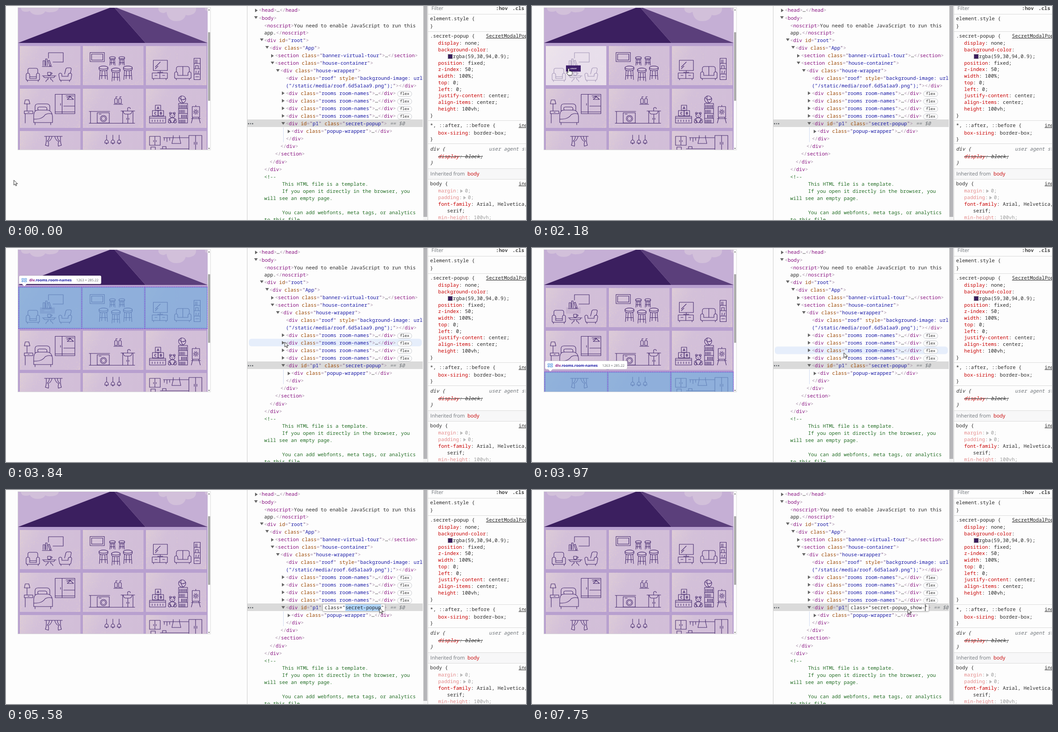
An HTML page for the animation above (8 s loop, 1163 px wide and 481 px high).

```html
<!DOCTYPE html>
<html lang="en">
<head>
<meta charset="utf-8">
<title>House inspector</title>
<style>
html, body { margin: 0; width: 100%; height: 100%; overflow: hidden; background: #fdfdfd; }
#stage { position: relative; width: 1163px; height: 481px; overflow: hidden; text-rendering: geometricPrecision; }
#stage > svg { position: absolute; left: 0; top: 0; }
#tree, #css { position: absolute; top: 0; height: 481px; overflow: hidden; font: 11.08px/17px "Noto Sans Mono", monospace; color: #2a2a2a; }
#tree { left: 540px; width: 392px; }
#css { left: 944px; width: 219px; }
.line { position: absolute; white-space: pre; height: 17px; }
.sans { font-family: "Open Sans", "Noto Sans", sans-serif; font-size: 11.4px; }
.t { color: #a48ca4; } .q { color: #6f4c7c; } .n { color: #881280; } .a { color: #994500; } .v { color: #1a1aa6; }
.c { color: #236e25; } .p { color: #c80000; } .g { color: #70757a; } .i { font-style: italic; }
.u { text-decoration: underline; } .dim { opacity: .45; } .bar { font-weight: 600; color: #444; }
.rule { position: absolute; left: 0; width: 219px; height: 1px; background: #dadada; }
.tri { position: absolute; width: 0; height: 0; border: solid transparent; }
.shut { border-width: 4px 0 4px 6px; border-left-color: #666; }
.open { border-width: 6px 4px 0; border-top-color: #666; }
.badge { position: absolute; left: 335px; width: 31px; height: 11px; border: 1px solid #c4c7cc; border-radius: 7px; font-size: 8.8px; line-height: 11px; text-align: center; background: #fdfdfd; }
#picked { position: absolute; left: 0; top: 255px; width: 392px; height: 17px; background: #dadada; animation: pick 8s step-end infinite; }
#hover { position: absolute; left: 3px; top: 0; width: 387px; height: 17px; border-radius: 6px; background: #e6eefb; animation: hover 8s step-end infinite; }
#row { display: flex; }
#attr { position: relative; display: flex; }
#edit { position: absolute; left: -3px; top: 1px; right: -2px; height: 15px; line-height: 15px; padding-left: 3px; display: flex; background: #fff; color: #222; box-shadow: 0 0 0 1px #bbb, 0 1px 4px #0005; animation: edit 8s step-end infinite; }
#sel { animation: sel 8s step-end infinite; }
.typed { overflow: hidden; width: 0; animation: type 8s step-end infinite; }
#caret { width: 1px; margin-right: -1px; background: #000; animation: caret 8s step-end infinite; }
#veil { animation: veil 8s step-end infinite; }
#btn { animation: btn 8s step-end infinite; }
#mark1 { animation: mark1 8s step-end infinite; }
#mark3 { animation: mark3 8s step-end infinite; }
#cursor { animation: move 8s step-end infinite; }
#arrow { animation: arrow 8s step-end infinite; }
#hand { animation: hand 8s step-end infinite; }
.art { fill: none; stroke: #43286c; stroke-width: 1.1; stroke-linejoin: round; stroke-linecap: round; }

@keyframes move {
  0% { transform: translate(17.5px, 391px); }
  1.875% { transform: translate(15.5px, 372px); }
  3.375% { transform: translate(15.5px, 351px); }
  5.25% { transform: translate(16px, 305px); }
  6.75% { transform: translate(22px, 271px); }
  8.625% { transform: translate(36px, 212px); }
  10.25% { transform: translate(66px, 158px); }
  11.75% { transform: translate(80px, 144px); }
  16.875% { transform: translate(81px, 142px); }
  18.375% { transform: translate(82px, 141px); }
  27.25% { transform: translate(82px, 140px); }
  46.125% { transform: translate(381px, 173px); }
  48% { transform: translate(623.5px, 211px); }
  49.625% { transform: translate(697.5px, 235px); }
  51.375% { transform: translate(724px, 248px); }
  53% { transform: translate(748px, 273px); }
  54.5% { transform: translate(764px, 278px); }
  56.25% { transform: translate(780.5px, 278px); }
  58.125% { transform: translate(797px, 270px); }
  59.625% { transform: translate(810px, 263px); }
  61.125% { transform: translate(821px, 259px); }
  63.125% { transform: translate(826px, 254px); }
  64.875% { transform: translate(830px, 259px); }
  66.375% { transform: translate(834px, 264px); }
  68% { transform: translate(835px, 265px); }
  69.75% { transform: translate(835.5px, 265px); }
  73% { transform: translate(837px, 266px); }
  74.75% { transform: translate(838.5px, 266px); }
  78.125% { transform: translate(838px, 263px); }
  79.625%, 100% { transform: translate(840.5px, 267px); }
}
@keyframes arrow { 0% { opacity: 1; } 10.25% { opacity: 0; } 48%, 100% { opacity: 1; } }
@keyframes hand { 0% { opacity: 0; } 10.25% { opacity: 1; } 48%, 100% { opacity: 0; } }
@keyframes veil { 0% { opacity: 0; } 10.25% { opacity: .12; } 11.75% { opacity: .25; } 13.5% { opacity: .38; } 15% { opacity: .5; } 48%, 100% { opacity: 0; } }
@keyframes btn { 0% { opacity: 0; } 10.25% { opacity: .2; } 11.75% { opacity: .45; } 13.5% { opacity: .65; } 15% { opacity: .8; } 16.875% { opacity: .93; } 18.375% { opacity: 1; } 48% { opacity: .25; } 49.625% { opacity: .08; } 51.375%, 100% { opacity: 0; } }
@keyframes mark1 { 0% { opacity: 0; } 48% { opacity: 1; } 49.625%, 100% { opacity: 0; } }
@keyframes mark3 { 0% { opacity: 0; } 49.625% { opacity: 1; } 51.375%, 100% { opacity: 0; } }
@keyframes hover {
  0% { transform: translateY(-30px); }
  48% { transform: translateY(204px); }
  49.625% { transform: translateY(221.5px); }
  51.375% { transform: translateY(238.5px); }
  53% { transform: translateY(273px); }
  58.125%, 100% { transform: translateY(-30px); }
}
@keyframes pick { 0% { background: #dadada; } 64.875% { background: #cfe8fc; } 66.375%, 100% { background: #dadada; } }
@keyframes edit { 0% { opacity: 0; } 66.375%, 100% { opacity: 1; } }
@keyframes sel { 0% { background: #b0d6fb; } 74.75%, 100% { background: transparent; } }
@keyframes caret { 0% { opacity: 0; } 76.25% { opacity: 1; } 83% { opacity: 0; } 89.625%, 100% { opacity: 1; } }
@keyframes type { 0% { width: 0; } 89.625% { width: 1ch; } 93.25% { width: 3ch; } 95% { width: 5ch; } 96.875%, 100% { width: 6ch; } }
</style>
</head>
<body>
<div id="stage">
<svg width="1163" height="481">
  <defs>
    <clipPath id="view"><rect x="27" y="4" width="424" height="319"/></clipPath>
    <linearGradient id="wall" x2="1" y2=".4"><stop stop-color="#dccbd8"/><stop offset=".35" stop-color="#d3c0d9"/><stop offset="1" stop-color="#d2bed8"/></linearGradient>
    <g id="stool">
      <ellipse cx="11" cy="4" rx="10" ry="3.6"/>
      <path d="M1 4V7Q1 11 11 11T21 7V4M3.500 10L2 31M18.500 10L20 31M8 11.500L7 29M14 11.500L15 29M3 22H19"/>
    </g>
    <g id="pendant"><path d="M0 290V301M-4 308Q-4 301 0 301T4 308ZM-1.5 308Q0 313 1.5 308"/></g>
    <g id="tip">
      <path d="M32 62H210Q213 62 213 65V78Q213 81 210 81H46L41 86.5L36 81H32Q29 81 29 78V65Q29 62 32 62Z" fill="#fff" stroke="#0002"/>
      <path d="M35.5 68.5H40V71.5H35.5ZM42 68.5H46V71.5H42ZM35.5 73.5H38V76H35.5ZM40 73.5H46V76H40Z" fill="none" stroke="#4a8fe0"/>
      <g font-family="Open Sans, Noto Sans, sans-serif">
        <text x="52" y="75" font-size="8.25" font-weight="700" fill="#1a1aa6"><tspan fill="#881280">div</tspan>.rooms.room-names</text>
        <text x="157" y="75" font-size="7.7" fill="#5f6368">1263 × 285.22</text>
      </g>
    </g>
  </defs>
  <rect x="26.5" y="3.5" width="431" height="320" fill="#fdfdfd" stroke="#dcdcdc"/>
  <g clip-path="url(#view)">
    <rect x="27" y="4" width="424" height="319" fill="#c5afd5"/>
    <path d="M33 4Q34 13 45 13Q50 13 53 11Q58 20 71 20Q83 20 88 12Q93 15 100 14Q117 13 118 4ZM341 4Q339 14 352 16Q356 15 359 13Q362 34 381 34Q398 34 402 20Q407 22 413 20Q426 17 425 4ZM451 4H445Q444 10 451 12Z" fill="#d2c0da"/>
    <rect x="27" y="83" width="424" height="240" fill="#b8a0cf"/>
    <path d="M27 83L240 1L312 83Z" fill="#3b1f5f"/>
    <path d="M240 1L451 83H312Z" fill="#5b3f7b"/>
    <g id="cards"></g>
    <g class="art">
      <path d="M95 117V105H128V126H105M81 136H103M83 134V123H87V134M88.500 134V119H92V134M94 123L97 122L101 134L98 135Z"/>
      <path d="M49 151V144Q49 140 53 140H67Q71 140 71 144V151M45 155Q45 151 49 151T53 155V159H68V155Q68 151 71.500 151T75 155V164Q75 167 72 167H48Q45 167 45 164ZM53 159V163H68V159M48 167V170M72 167V170"/>
      <path d="M131 153L134 141Q135 139 138 139H143Q146 139 146 142L144 151M118 155Q118 151 121.500 151T125 155V158H139V154Q140 151 143.500 151T147 155L145 165Q144 167 141 167H123Q120 167 120 165ZM123 167V170M142 167V170"/>
      <path d="M81 157H112M84 157Q84 161 88 161H105Q109 161 109 157M94 161V165Q90 166 89 170M100 161V165Q104 166 105 170M93 149H100V153Q100 156 96.500 156T93 153ZM100 150Q104 150 103 152T100 154"/>
      <path d="M188 104.500H220V125H188ZM191.500 108H216.500V121.500H191.500Z"/>
      <use href="#stool" transform="translate(231 113.500)scale(.64)" stroke-width="1.6"/><use href="#stool" transform="translate(252 113.500)scale(.64)" stroke-width="1.600"/>
      <use href="#stool" transform="translate(207 134.500)"/><use href="#stool" transform="translate(235 139)scale(.97)"/><use href="#stool" transform="translate(261.500 134.500)"/>
      <path d="M329.500 122H361V145H329.500ZM334 137L345 126M334 141L340 135M345 145V149M339 149H351M327 150.500H361V163H327ZM344 150.500V163M330 163V166M358 163V166M333 156H338M350 156H355"/>
      <path d="M381 148V141Q381 136 386 136H405Q410 136 410 141V148M395.500 136V156M377 152Q377 148 380.500 148T384 152V156H407V152Q407 148 410.500 148T414 152V160Q414 163 411 163H380Q377 163 377 160ZM381 163V166M410 163V166"/>
      <path d="M420.500 117.500H434.500V165.500H420.500ZM420.500 129H434.500M420.500 141H434.500M420.500 153H434.500M424 121V129M427 121V129M424 141V134H430V141M425 153V146M429 153L431 146M424 159H431"/>
      <path d="M43 211H51L53.500 220H41ZM47 220V235M41 236H60V242H41ZM43 242V263M49 239H52"/>
      <path d="M65 236V226Q65 220 72 220H91Q98 220 98 227V235M72 234Q69 227 75 227H88Q93 228 91 234M62 262V245Q63 234 71 234H94Q103 236 104 248V262ZM62 254Q80 256 88 244Q96 240 103 243M65 262V267M100 262V267"/>
      <path d="M110 198.500H154V242H110ZM125.500 198.500V242M110 238H154M122 219V223M134 202H152M136 206L143 203L151 210H137L144 204M129 225H154"/>
      <path d="M241 221H261M243 219V210Q243 208 246 208T249 210V219ZM252 219V210Q252 208 255 208T258 210V219ZM246 208V204H249M255 208V204H258"/>
      <path d="M186 237H232M189 237V263M204 240H231V263H204ZM186 263.500H288M208 243H213"/><circle cx="218" cy="253" r="7"/><circle cx="218" cy="253" r="4.500"/>
      <path d="M257 236H288M262 236Q263 243 268 243H276Q281 243 282 236M272 236V231Q272 228 275 228T278 231M261 236V263M284 236V263M272.500 244V263M270 252V255M275 252V255"/>
      <path d="M334 223H346V234.500H334ZM327.500 235H340V247H327.500ZM340.500 235H352.500V247H340.500ZM321 248H357V263H321ZM321 252H357M327 256V260M333 256V260M339 256V260M345 256V260M351 256V260"/>
      <circle cx="372" cy="246" r="5.500"/><circle cx="367.500" cy="241" r="2"/><circle cx="376.500" cy="241" r="2"/><ellipse cx="372" cy="256.500" rx="5.500" ry="6"/><circle cx="366" cy="260" r="3"/><circle cx="378" cy="260" r="3"/>
      <path d="M370 245V245.500M374 245V245.500M371 248H373M366 253L363 256M378 253L381 256"/>
      <circle cx="394" cy="210" r="8"/><path d="M387 206Q394 214 402 208M392 202Q389 210 396 218M386 219H406V263H386ZM386 230.500H406M386 241.500H406M386 252.500H406"/>
      <path d="M388.500 226H404M388.500 237H400M392 248H404M388.500 259H402" stroke-width="7" stroke-dasharray="1.500 2" stroke-linecap="butt"/>
      <path d="M416.500 226H433V250H416.500ZM418 250L414.500 263M431 250L434.500 263M414.500 253H435M424.500 226V223"/><circle cx="424.500" cy="238" r="2.600"/><circle cx="424.500" cy="238" r="5.200" stroke-dasharray="1.500 2.580"/>
      <path d="M86 293H126M90 293Q91 306 88 313L95 315Q96 308 94 305Q101 302 103 293M122 293Q121 306 124 313L117 315Q116 308 118 305Q111 302 109 293M97 293Q97 300 92 304M115 293Q115 300 120 304"/>
      <use href="#pendant" x="225"/><use href="#pendant" x="239"/><use href="#pendant" x="253"/>
      <path d="M321 293H345V313H321ZM333 293V313M330 302V305M336 302V305M352 296H408M354 296V302M360 296V305M366 296V302M374 291V296M388 291V296M374 296L371 309H391L388 296M409 291H438V323M409 291V323M424 291V323M421 306V311M427 306V311M324 323V317H334V323M345 321H409M350 321V316H358V321"/>
      <g font-family="Open Sans, sans-serif" font-size="8" font-weight="700" fill="#43286c" stroke="none" text-anchor="middle"><text x="340" y="232">A</text><text x="334" y="244">C</text><text x="346.500" y="244">B</text></g>
    </g>
    <rect id="veil" x="31" y="90" width="135" height="88" fill="#fff"/>
    <g id="btn"><rect x="76" y="133.500" width="33" height="14" fill="#3f1f6b"/><text x="92.500" y="142" font-family="Open Sans, sans-serif" font-size="3.600" font-weight="700" fill="#fff" text-anchor="middle">LIBRARY</text></g>
    <g id="mark1"><rect x="27" y="87" width="425" height="95" fill="#6fa8dc" opacity=".68"/><path d="M28 87.500H451M28 181.500H451M28.500 87V182M169.500 87V182M310.500 87V182M450.500 87V182" stroke="#8a2bd0" stroke-dasharray="2.500 1.500"/></g>
    <g id="mark3"><rect x="27" y="278" width="425" height="46" fill="#6fa8dc" opacity=".68"/><path d="M28 278.500H451M28.500 278V323M169.500 278V323M310.500 278V323M450.500 278V323" stroke="#8a2bd0" stroke-dasharray="2.500 1.500"/><use href="#tip" y="191.500"/></g>
  </g>
  <use href="#tip" style="animation:mark1 8s step-end infinite"/>
  <rect x="452" y="59" width="4.500" height="154" fill="#a6a6a6"/>
  <path d="M452 10L454 7L456 10ZM452 319L454 322L456 319Z" fill="#777"/>
  <path d="M539.500 0V481M943.500 0V481" stroke="#cdcdcd"/>
  <rect x="933" y="0" width="10" height="481" fill="#f4f4f4"/><rect x="933.500" y="0" width="8.500" height="474" fill="#b5b5b8"/>
</svg>
<div id="tree"><div id="picked"></div><div id="hover"></div></div>
<div id="css"></div>
<svg width="1163" height="481"><g id="cursor" stroke="#222" stroke-linejoin="round" fill="#fff">
  <path id="arrow" d="M0 .5V11.500L2.700 9.200L4.500 13.300L6.300 12.500L4.600 8.500H8.300Z"/>
  <path id="hand" d="M-1.500 10V1.500Q-1.500 .3 0 .3T1.500 1.500V6.500Q3 5.500 4 6.800Q5.500 6 6.200 7.300Q8 7 8 9V12Q8 14 6.500 15.700H-.5Q-2.500 13 -4.800 10Q-4 7.500 -1.500 10Z"/>
</g></svg>
</div>
<script>
const tree = document.getElementById('tree'), css = document.getElementById('css');
const esc = s => s.replace(/</g, '&lt;').replace(/>/g, '&gt;');
const span = (c, s) => `<span class="${c}">${esc(s)}</span>`;
const put = (box, html) => box.insertAdjacentHTML('beforeend', html);
const line = (box, x, y, html, cls = '') =>
  put(box, `<div class="line ${cls}" style="left:${x}px;top:${y - 8.5}px">${html}</div>`);

// Colours one line of markup
const quote = span('q', '"'), equals = span('t', '=') + quote;
const paint = s => s.replace(/(<\/?)([a-z]+)|([a-z]+)="([^"]*)("?)|(>)/g, (m, lt, name, attr, val, q, gt) =>
  lt ? span('t', lt) + span('n', name) :
  gt ? span('t', gt) :
  span('a', attr) + equals + span('v', val) + span('q', q));

const pad = k => 25.4 + 12.1 * k;
const node = (k, y, s, fold) => {
  line(tree, pad(k), y, paint(s));
  if (fold) put(tree, `<i class="tri ${fold}" style="left:${pad(k) - (fold === 'open' ? 10 : 8.5)}px;top:${y - 4}px"></i>`);
};
const room = '<div class="rooms room-names">…</div>';
[
  [0, 9.5, '<head>…</head>', 'shut'], [0, 27, '<body>', 'open'],
  [1, 44, '<noscript>You need to enable JavaScript to run this'], [1, 60, 'app.</noscript>'],
  [1, 77, '<div id="root">', 'open'], [2, 94, '<div class="App">', 'open'],
  [3, 111.5, '<section class="banner-virtual-tour">…</section>', 'shut'],
  [3, 128.5, '<section class="house-container">', 'open'],
  [4, 145.5, '<div class="house-wrapper">', 'open'],
  [5, 162.5, '<div class="roof" style="background-image: url'],
  [5, 196, room, 'shut'], [5, 213, room, 'shut'], [5, 230, room, 'shut'], [5, 247, room, 'shut'],
  [5, 264.5, '', 'open'], [6, 281.5, '<div class="popup-wrapper">…</div>', 'shut'],
  [5, 298.5, '</div>'], [4, 315.5, '</div>'], [3, 332.5, '</section>'], [2, 350, '</div>'], [1, 367, '</div>']
].forEach(r => node(...r));
line(tree, pad(5), 179, span('v', '("/static/media/roof.6d5a1aa9.png");') + quote + paint('></div>'));
[196, 213, 230, 247].forEach(y => put(tree, `<div class="badge" style="top:${y - 5.5}px">flex</div>`));
put(tree, '<div style="position:absolute;left:80px;top:273px;width:1px;height:33px;background:#cfdcf2"></div>');
[1, 5.5, 10].forEach(x => put(tree, `<i style="position:absolute;left:${x}px;top:263px;width:2.5px;height:2.5px;border-radius:2px;background:#5f6368"></i>`));

const typed = '<span class="typed"> show-</span>';
line(tree, pad(5), 264.5, `<div id="row"><span>${paint('<div id="p1" ')}</span><span id="attr">` +
  `<span>${span('a', 'class') + equals + span('v', 'secret-popup')}</span>${typed}${quote}` +
  `<span id="edit"><span>class="</span><span id="sel">secret-popup</span>${typed}<span id="caret"></span><span>"</span></span>` +
  `</span>${span('t', '>')}${span('g i', ' == $0')}</div>`);

[[384, 0, '<!--'], [400, 6, 'This HTML file is a template.'], [416, 6, 'If you open it directly in the browser, you'],
 [432, 0, 'will see an empty page.'], [464, 6, 'You can add webfonts, meta tags, or analytics'], [480, 0, 'to this file.']
].forEach(([y, n, s]) => line(tree, pad(1), y, span('c', ' '.repeat(n) + s)));

// Style rules
[18, 57, 257, 309, 365, 389].forEach(y => put(css, `<div class="rule" style="top:${y}px"></div>`));
put(css, '<div style="position:absolute;top:366px;width:219px;height:23px;background:#f7f7f8"></div>');
const prop = (y, name, value, cls) => line(css, 22.6, y, span('p', name) + ': ' + value, cls);
const sel = (y, s, cls) => line(css, 4.6, y, esc(s), cls);
line(css, 7.5, 5, 'Filter', 'sans g');
line(css, 151.5, 5, ':hov', 'bar');
line(css, 188.5, 5, '.cls', 'bar');
sel(28, 'element.style {'); sel(67, '.secret-popup {'); sel(268, '*, ::after, ::before {');
sel(321, 'div {', 'i'); sel(399, 'body {');
[45, 246, 299].forEach(y => sel(y, '}'));
sel(352, '}', 'i');
line(css, 129.6, 67, 'SecretModalPopup.css', 'u');
[268, 399].forEach(y => line(css, 202.6, y, 'index.css', 'u'));
line(css, 136, 321, 'user agent stylesheet', 'i g');
[[83.5, 'display', 'none;'], [98, 'background-color', ''], [128, 'position', 'fixed;'], [142.5, 'z-index', '50;'],
 [157, 'width', '100%;'], [172, 'top', '0;'], [187, 'left', '0;'], [201.5, 'justify-content', 'center;'],
 [216, 'align-items', 'center;'], [231, 'height', '100vh;'], [285, 'box-sizing', 'border-box;'],
 [415, 'margin', ' 0;', 'dim'], [430, 'padding', ' 0;', 'dim'], [445, 'font-family', 'Arial, Helvetica, sans-'],
 [475, 'min-height', '100vh;', 'dim']].forEach(r => prop(...r));
[[72, 415], [79, 430]].forEach(([x, y]) => put(css, `<i class="tri shut dim" style="left:${x}px;top:${y - 3.5}px"></i>`));
line(css, 22.6, 338, `<s>${span('p', 'display')}: block;</s>`, 'i');
put(css, '<i style="position:absolute;left:44px;top:108px;width:9px;height:9px;background:#3b1e5e;border:.5px solid #999"></i>');
line(css, 55.6, 113, 'rgba(59,30,94,0.9);');
line(css, 42.6, 460, 'serif;');
line(css, 5, 377, '<span class="g">Inherited from</span>', 'sans');
line(css, 88, 377, span('p', 'body'), 'sans');

// Room walls with a seeded grain along the left and lower right edges
let seed = 7;
const rnd = () => (seed = seed * 16807 % 2147483647) / 2147483647;
let walls = '', grain = '';
for (const y of [90, 186, 281]) for (const x of [31, 172, 313]) {
  walls += `<rect x="${x}" y="${y}" width="135.500" height="88" fill="url(#wall)"/>`;
  for (let i = 0; i < 420; i++) {
    const u = rnd() ** 3 * 70, v = rnd() * 87, flip = i % 4 === 0;
    const gx = flip ? 134 - u * .6 : u, gy = flip ? 87 - rnd() ** 2 * 50 : v;
    grain += `M${(x + gx).toFixed(1)} ${(y + gy).toFixed(1)}h1`;
  }
}
document.getElementById('cards').innerHTML = walls + `<path d="${grain}" stroke="#e8d3cc" opacity=".6"/>`;
</script>
</body>
</html>
```
